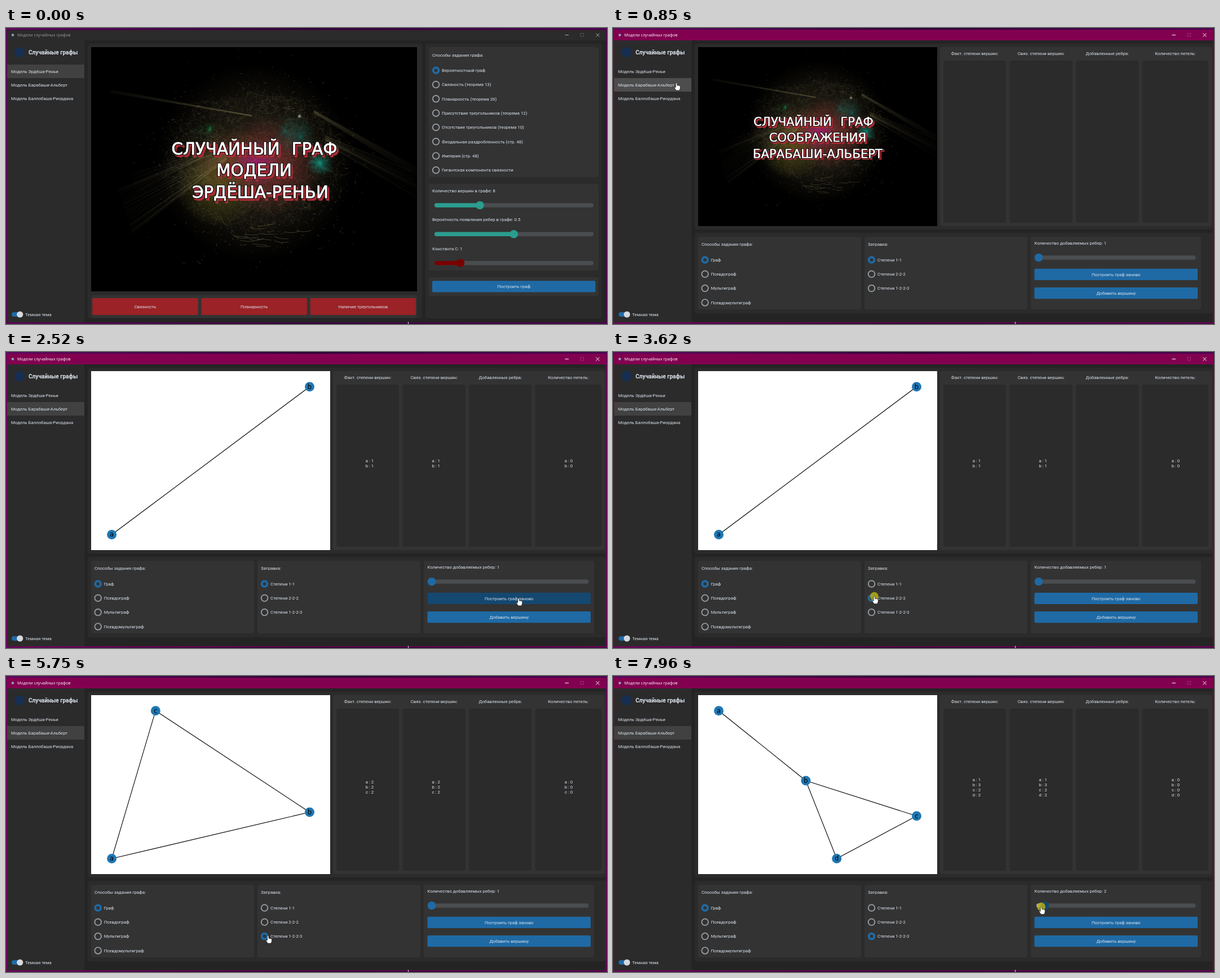
An HTML page with a canvas that plays this animation: 1066 px wide and 526 px high, repeating every 7.99 s.

```html
<!DOCTYPE html>
<html lang="ru">
<head>
<meta charset="utf-8">
<title>Модели случайных графов</title>
<style>
  html, body { margin: 0; width: 100%; height: 100%; overflow: hidden; background: #2b0433; }
  svg, canvas { position: absolute; left: 0; top: 0; }
  canvas { left: 151px; top: 34px; }
  text { font: 7.8px Roboto, sans-serif; fill: #dce4ee; white-space: pre; }
  .mid { text-anchor: middle; }
  .caption { font: 7.2px "Open Sans", sans-serif; }
  .brand { font: bold 10.1px Roboto, sans-serif; }
  .node { font: 11.5px "DejaVu Sans", sans-serif; fill: #000; text-anchor: middle; }
  .art text { font: 29.3px "DejaVu Sans", sans-serif; word-spacing: .4em; text-anchor: middle;
    text-transform: uppercase; stroke-linejoin: round; fill: #fff; stroke: #fff; stroke-width: .9px; }
  .art.small text { font-size: 21.2px; stroke-width: .6px; }
  .art text.shade { fill: #b5323a; stroke: #a92c34; stroke-width: 2.2px; }
  .art text.outline { fill: #000; stroke: #000; stroke-width: 3.2px; }
  .art.small text.outline { stroke-width: 2.5px; }
</style>
</head>
<body>
<svg id="ui" width="1066" height="526"></svg>
<canvas id="cloud" width="578" height="434"></canvas>
<svg id="top" width="1066" height="526"></svg>
<script>
const LOOP = 7990;
const BLUE = '#1f6aa5', DARK_BLUE = '#144870', FRAME = '#2b2b2b', PANEL = '#333333';
const TRACK = '#4a4d50', GREY = '#949a9f';
const $ = id => document.getElementById(id);

// --- drawing helpers (boxes are left, top, right, bottom)
const box = (x, y, x2, y2, fill, r = 0, more = '') =>
  `<rect x="${x}" y="${y}" width="${x2 - x}" height="${y2 - y}" rx="${r}" fill="${fill}" ${more}/>`;
const text = (x, y, s, cls = '', more = '') =>
  `<text x="${x}" y="${y + 2.8}" class="${cls}" ${more}>${s}</text>`;
const disc = (x, y, r, fill, more = '') => `<circle cx="${x}" cy="${y}" r="${r}" fill="${fill}" ${more}/>`;
const group = (id, body) => `<g id="${id}">${body}</g>`;
const radio = (x, y, label, on, id = '') =>
  disc(x, y, on ? 4.9 : 5.8, 'none', `id="${id}" stroke="${on ? BLUE : GREY}" stroke-width="${on ? 3.8 : 1.9}"`) +
  text(x + 10.5, y, label);
const button = (x, y, x2, y2, label, fill = BLUE, id = '') =>
  box(x, y, x2, y2, fill, 2, `id="${id}"`) + text((x + x2) / 2, (y + y2) / 2, label, 'mid');
const slider = (y, label, knob, color) =>
  text(756, y, label) + box(760, y + 22.3, 1042, y + 29.7, TRACK, 3.7) +
  box(760, y + 22.3, knob, y + 29.7, color, 3.7) + disc(knob, y + 26, 7.3, color);

// --- window
const models = ['Модель Эрдёша-Реньи', 'Модель Барабаши-Альберт', 'Модель Баллобаша-Риордана'];
const chrome =
  `<linearGradient id="desk"><stop stop-color="#5c0a5c"/><stop offset=".5" stop-color="#2c0438"/>
   <stop offset="1" stop-color="#4a0650"/></linearGradient>` +
  box(0, 0, 1066, 526, 'url(#desk)') +
  box(1.5, 3.5, 1064.5, 523.5, '#242424', 0, 'id="edge" stroke="#4d0540"') +
  box(2, 4, 1064, 22, FRAME, 0, 'id="bar"') +
  disc(12, 12.5, 2.2, '#8fa6ba') +
  text(20, 12.4, 'Модели случайных графов', 'caption', 'id="caption"') +
  `<path id="controls" d="M991.5 12.5h6.5M1046.5 9.5l6 6m0-6l-6 6" stroke="#fff" fill="none"/>
   <path d="M1019 9.5h5.5v5.5h-5.5z" stroke="#fff" stroke-opacity=".22" stroke-width=".8" fill="none"/>` +
  box(2, 22, 139, 523, FRAME) + disc(24, 43, 9, '#162f52') + text(40, 43.8, 'Случайные графы', 'brand') +
  models.map((m, i) => box(2, 65 + 24 * i, 139, 89 + 24 * i, FRAME, 0, `id="item${i}"`) + text(9, 77 + 24 * i, m)).join('') +
  box(10, 505, 29, 513, BLUE, 4) + disc(24.7, 509, 5.6, '#d5d9de') + text(34, 509, 'Темная тема') +
  box(713, 522, 714, 526, '#ddd');

// --- first page
const kinds = ['Вероятностный граф', 'Связность (теорема 13)', 'Планарность (теорема 26)',
  'Присутствие треугольников (теорема 12)', 'Отсутствие треугольников (теорема 10)',
  'Феодальная раздробленность (стр. 48)', 'Империя (стр. 48)', 'Гигантская компонента связности'];
const page1 =
  box(145, 28, 738, 516, FRAME, 4) + box(151, 475, 729, 515, PANEL, 4) +
  ['Связность', 'Планарность', 'Наличие треугольников']
    .map((s, i) => button(153.2 + 193.2 * i, 480, 340.7 + 193.2 * i, 510, s, '#9b2226')).join('') +
  box(744, 28, 1057, 516, FRAME, 4) + box(750, 34, 1051, 265, PANEL, 4) +
  box(750, 277, 1051, 431, PANEL, 4) + box(750, 443, 1051, 476, PANEL, 4) +
  text(756, 48, 'Способы задания графа:') +
  kinds.map((s, i) => radio(762.6, 75.2 + 25.33 * i, s, i == 0)).join('') +
  slider(289, 'Количество вершин в графе: 8', 840.5, '#2a9d8f') +
  slider(340.3, 'Вероятность появления ребер в графе: 0.5', 900.7, '#2a9d8f') +
  slider(391.7, 'Константа C: 1', 806, '#7a0000') +
  button(756, 449.3, 1045.5, 469.6, 'Построить граф');

// --- second page
const columns = [[586, 697, 'Факт. степени вершин:'], [703.5, 815, 'Связ. степени вершин:'],
  [821, 932.5, 'Добавленные ребра:'], [938.5, 1056, 'Количество петель:']];
const seeds = ['Степени 1-1', 'Степени 2-2-2', 'Степени 1-2-2-3'];
const rowY = i => 412 + 25.3 * i;
const page2 =
  box(145, 28, 1064, 358, FRAME, 4) + box(580, 34, 1062, 352, PANEL, 4) +
  columns.map(([x, x2, s]) => box(x, 58, x2, 346, FRAME, 4) + text((x + x2) / 2, 45.6, s, 'mid')).join('') +
  box(145, 364, 1064, 507, FRAME, 4) +
  box(151, 371, 440, 500, PANEL, 4) + box(446, 371, 735, 500, PANEL, 4) + box(741, 371, 1043, 500, PANEL, 4) +
  text(157, 384.5, 'Способы задания графа:') + text(452, 384.5, 'Затравка:') +
  ['Граф', 'Псевдограф', 'Мультиграф', 'Псевдомультиграф']
    .map((s, i) => radio(163.2, rowY(i), s, i == 0)).join('') +
  seeds.map((s, i) => radio(458.6, rowY(i), s, false, 'seed' + i)).join('') +
  text(747.5, 382.3, '', '', 'id="amount"') +
  box(751, 404.3, 1033.5, 411.7, TRACK, 3.7) + box(751, 404.3, 760, 411.7, '#aab0b5', 3.7, 'id="done"') +
  disc(755, 408, 7.3, BLUE, 'id="knob"') +
  button(747.5, 427.7, 1037, 448, 'Построить граф заново', BLUE, 'build') +
  button(747.5, 460.9, 1037, 481.2, 'Добавить вершину');

// --- graphs
const graphs = [
  { nodes: [[187.6, 324.5], [538.5, 61.7]], edges: ['ab'] },
  { nodes: [[187.6, 324.5], [538.5, 242], [265.3, 61.7]], edges: ['ab', 'bc', 'ca'] },
  { nodes: [[187.6, 61.7], [342, 186], [538.5, 248.7], [396.8, 324.5]], edges: ['ab', 'bc', 'bd', 'cd'] }
];
const index = c => c.charCodeAt(0) - 97;
const drawGraph = ({ nodes, edges }, n) => {
  const names = nodes.map((_, i) => String.fromCharCode(97 + i));
  const list = (x, value) => names.map((c, i) =>
    text(x, 197.3 + 9 * (i - (nodes.length - 1) / 2), `${c} : ${value(c)}`, 'mid')).join('');
  const degree = c => edges.filter(e => e.includes(c)).length;
  return group('graph' + n, box(151, 34, 575, 352, '#fff') +
    edges.map(e => `<path d="M${nodes[index(e[0])]}L${nodes[index(e[1])]}" stroke="#000" stroke-width="1.1"/>`).join('') +
    nodes.map(([x, y], i) => disc(x, y, 8.5, '#1f77b4') + text(x, y + 1, names[i], 'node')).join('') +
    list(645, degree) + list(762.7, degree) + list(998, () => 0));
};
$('ui').innerHTML = chrome + group('page1', page1) + group('page2', page2 + graphs.map(drawGraph).join(''));

// --- lettering and pointer
const artLine = ([x, y, s], depth) => [3, 2, 1].map(k =>
  text(x + k * depth, y + k * depth, s, 'shade')).join('') + text(x, y, s, 'outline') + text(x, y, s);
const art = (id, cls, depth, lines) =>
  `<g id="${id}" class="art ${cls}">${lines.map(l => artLine(l, depth)).join('')}</g>`;
$('top').innerHTML =
  art('art1', '', 1.1, [[440.5, 222.5, 'Случайный граф'], [440, 260.5, 'модели'], [451, 299.5, 'Эрдёша-Реньи']]) +
  art('art2', 'small', .8, [[355.5, 171.5, 'Случайный граф'], [363, 199.5, 'соображения'], [363, 228, 'Барабаши-Альберт']]) +
  group('pointer', disc(0, 0, 7.4, '#b5ad14', 'id="press" opacity=".85"') +
    `<path id="hand" d="M-1.3 .8Q0-1 1.3 .8V4.6Q5 4 6.8 5.8V9.5L5.4 13.4H-.4L-3.7 8.6Q-3.6 6.6-1.3 8.2Z"
      fill="#fff" stroke="#111" stroke-width=".7"/>
     <path id="arrow" d="M0 0V11L2.6 8.6L4.3 12.4L6 11.6L4.4 8H7.8Z" fill="#fff" stroke="#111" stroke-width=".7"/>`);

// --- cloud of strands behind the lettering
function paintCloud() {
  const g = $('cloud').getContext('2d');
  let state = 11;
  const rnd = () => (state = (state * 16807) % 2147483647) / 2147483647;
  const spread = () => rnd() + rnd() + rnd() - 1.5;
  const line = (x, y, cx, cy, x2, y2, color, width = .6) => {
    g.strokeStyle = color;
    g.lineWidth = width;
    g.beginPath();
    g.moveTo(x, y);
    g.quadraticCurveTo(cx, cy, x2, y2);
    g.stroke();
  };
  const glow = (x, y, r, rgb, a) => {
    const fade = g.createRadialGradient(x, y, 0, x, y, r);
    fade.addColorStop(0, `rgba(${rgb},${a})`);
    fade.addColorStop(1, `rgba(${rgb},0)`);
    g.fillStyle = fade;
    g.fillRect(x - r, y - r, 2 * r, 2 * r);
  };
  // rays that fade out towards their far end
  const fan = (x, y, x2, y2, width, n, alpha) => {
    const fade = g.createLinearGradient(x, y, x2, y2);
    fade.addColorStop(0, `rgba(140,132,88,${alpha})`);
    fade.addColorStop(1, `rgba(140,132,88,${alpha * .2})`);
    for (let i = 0; i < n; i++) {
      const o = (rnd() - .5) * width;
      line(x, y + o * .25, x, y + o * .25, x2 + o * .3, y2 + o, fade, 1.2);
    }
  };
  const burst = (x, y, r, n, rgb) => {
    for (let i = 0; i < n; i++) {
      const a = rnd() * 6.283, d = r * (.25 + .75 * rnd());
      line(x + 3 * spread(), y + 3 * spread(), x + d * .5 * Math.cos(a + .4), y + d * .5 * Math.sin(a + .4),
        x + d * Math.cos(a), y + d * Math.sin(a), `rgba(${rgb},.35)`);
    }
  };
  g.fillStyle = '#000';
  g.fillRect(0, 0, 578, 434);
  glow(290, 205, 175, '75,69,45', .6);
  glow(225, 245, 75, '105,98,25', .6);
  glow(245, 205, 65, '125,70,38', .5);
  glow(318, 210, 90, '150,45,52', .65);
  glow(292, 206, 42, '165,20,120', .8);
  glow(360, 155, 38, '20,85,75', .45);
  glow(406, 206, 24, '20,115,100', .6);
  fan(415, 165, 578, 250, 60, 16, .16);
  fan(395, 115, 578, 222, 26, 10, .16);
  fan(285, 122, 34, 79, 6, 8, .16);
  fan(240, 190, 60, 292, 80, 45, .13);
  fan(200, 190, 75, 240, 36, 20, .1);
  for (let i = 0; i < 1500; i++) {
    const a = rnd() * 6.283, d = Math.pow(rnd(), .6);
    const x = 290 + 155 * d * Math.cos(a), y = 202 + 125 * d * Math.sin(a);
    const size = 12 + 18 * rnd();
    const warm = d < .5 && rnd() < .6;
    line(x, y, x + size * spread(), y + size * spread(), x + 1.3 * size * spread(), y + 1.3 * size * spread(),
      warm ? 'rgba(170,75,68,.16)' : `rgba(150,141,98,${.22 - .06 * d})`);
  }
  for (let i = 0; i < 550; i++) {
    const a = rnd() * 6.283, d = .65 + .65 * rnd() * rnd();
    const x = 290 + 190 * d * Math.cos(a), y = 208 + 165 * d * Math.sin(a);
    line(x, y, x + 2 * spread(), y + 2 * spread(), x + 5 * spread(), y + 4 * spread(),
      `rgba(150,143,105,${.1 + .4 * rnd()})`, .8);
  }
  for (let i = 0; i < 16; i++) {
    const x = 225 + 150 * rnd(), y = 308 + 48 * rnd();
    line(x, y, x + 12, y + 9 * spread(), x + 26, y + 6 * spread(), 'rgba(150,141,95,.4)', .9);
  }
  burst(406, 206, 24, 110, '20,140,122');
  burst(344, 148, 17, 30, '20,115,102');
  burst(372, 160, 30, 40, '20,105,92');
  burst(211, 146, 13, 45, '35,145,75');
  burst(196, 150, 26, 16, '30,100,55');
  burst(370, 123, 5, 30, '200,195,180');
}
paintCloud();

// --- pointer route: start, end, x, y, vertical bow
const route = [[130, 620, 112.5, 97.5, 0], [950, 1720, 921, 447, 0], [1980, 2060, 909, 437.5, 0],
  [2910, 3370, 463.5, 434, -14], [3720, 4310, 781, 437.5, 5], [4840, 5320, 462, 462, 14],
  [5720, 6310, 804, 442, -6], [7090, 7580, 757, 410, 0], [7860, 7960, 759.5, 410, 0]];
const presses = [[670, 790], [2390, 2520], [3520, 3720], [4310, 4380], [5520, 5720], [6310, 6380], [7740, LOOP]];

function pointerAt(t) {
  let x = 400, y = 540;
  for (const [from, to, x2, y2, bow] of route) {
    if (t < from) break;
    const p = Math.min(1, (t - from) / (to - from));
    const e = p * p * (3 - 2 * p);
    x += (x2 - x) * e;
    y += (y2 - y) * e + bow * Math.sin(Math.PI * e);
  }
  return [x, y];
}

const show = (id, on) => $(id).setAttribute('display', on ? 'inline' : 'none');
const paint = (id, attrs) => { for (const k in attrs) $(id).setAttribute(k, attrs[k]); };

function render(t) {
  const [x, y] = pointerAt(t);
  const inside = (l, top, r, b) => x >= l && x <= r && y >= top && y <= b;
  const second = t >= 790, active = t >= 670;
  const graph = t < 2520 ? -1 : t < 4410 ? 0 : t < 6380 ? 1 : 2;
  const seed = t < 3620 ? 0 : t < 5620 ? 1 : 2;
  const amount = t < 7930 ? 1 : 2;

  paint('bar', { fill: active ? '#820050' : FRAME });
  paint('edge', { stroke: active ? '#820050' : '#4d0540' });
  paint('controls', { 'stroke-opacity': active ? 1 : .6 });
  $('caption').style.fill = active ? '#fff' : '#9a9a9a';

  let hover = false;
  models.forEach((_, i) => {
    const over = inside(2, 65 + 24 * i, 139, 89 + 24 * i);
    hover = hover || over;
    paint('item' + i, { fill: over ? '#4d4d4d' : i == +second ? '#404140' : FRAME });
  });
  const overBuild = second && inside(747, 428, 1037, 448.5);
  const overKnob = second && inside(747, 400, 1037, 416);
  seeds.forEach((_, i) => {
    const over = second && inside(452, rowY(i) - 7, 528, rowY(i) + 7), on = i == seed;
    hover = hover || over;
    paint('seed' + i, { r: on ? 4.9 : 5.8, 'stroke-width': on ? 3.8 : 1.9,
      stroke: on ? BLUE : over ? DARK_BLUE : GREY });
  });
  hover = hover || overBuild || overKnob;
  const flash = t >= 4380 && t < 4410;
  paint('build', { fill: overBuild && !flash ? DARK_BLUE : BLUE });
  paint('knob', { cx: amount == 1 ? 755 : 766, fill: overKnob ? DARK_BLUE : BLUE });
  show('done', amount == 2);
  $('amount').textContent = 'Количество добавляемых ребер: ' + amount;

  show('page1', !second);
  show('page2', second);
  graphs.forEach((_, i) => show('graph' + i, i == graph));
  show('art1', !second);
  show('art2', second && graph < 0);
  const cloud = $('cloud').style;
  cloud.display = graph < 0 ? 'block' : 'none';
  cloud.width = second ? '424px' : '578px';
  cloud.height = second ? '318px' : '434px';

  paint('pointer', { transform: `translate(${x} ${y})` });
  show('press', presses.some(([from, to]) => t >= from && t < to));
  show('hand', hover);
  show('arrow', !hover);
}

function tick() {
  render(performance.now() % LOOP);
  requestAnimationFrame(tick);
}
tick();
</script>
</body>
</html>
```
